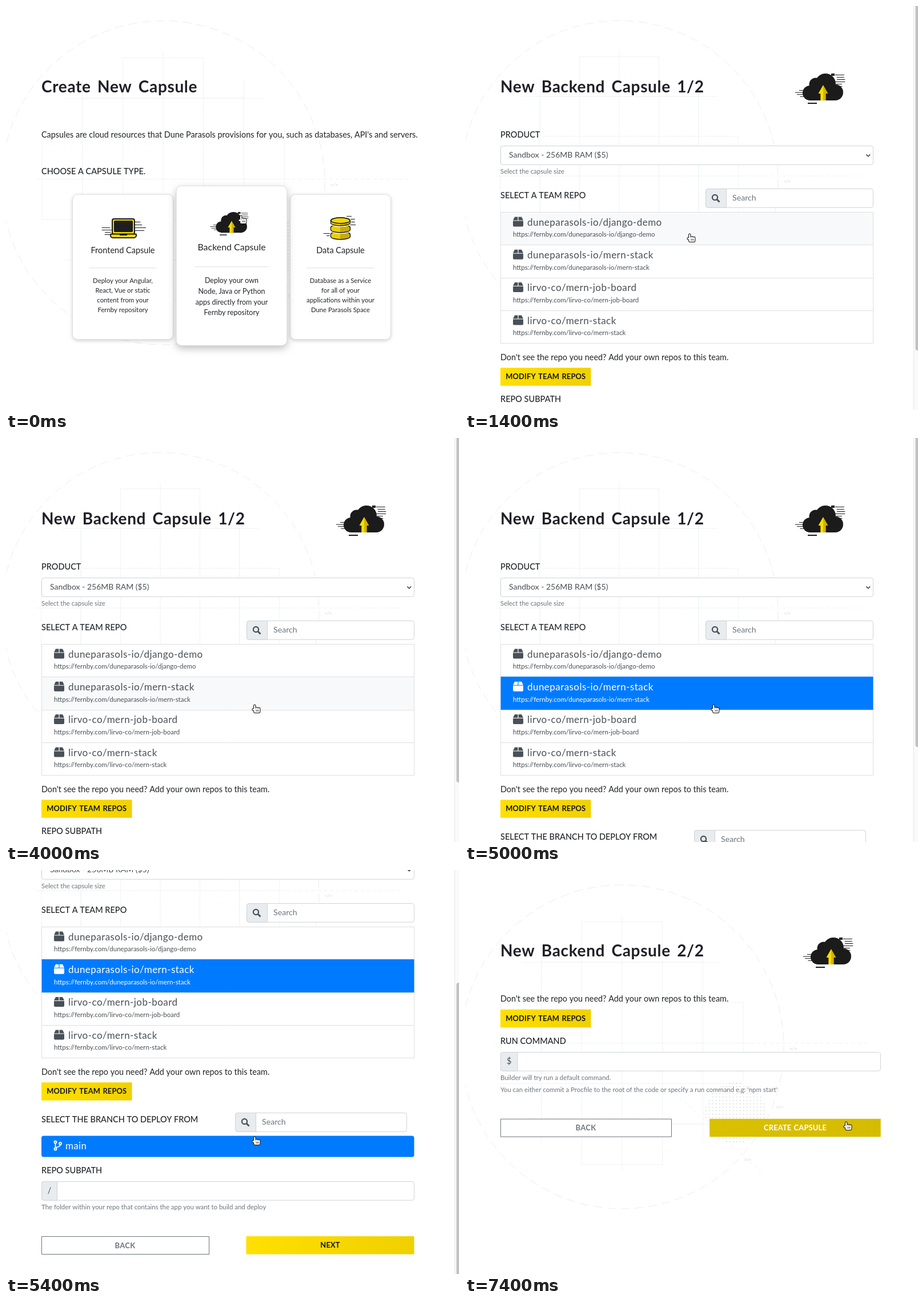
These frames come from a looping animation (793 px wide and 706 px high, 7600 ms). An HTML page with a canvas:

```html
<!DOCTYPE html>
<html lang="en">
<head>
<meta charset="utf-8">
<title>Create a capsule</title>
<style>
html, body { margin: 0; width: 100%; height: 100%; overflow: hidden; background: #fff; }
canvas { display: block; }
</style>
</head>
<body>
<canvas id="stage" width="793" height="706"></canvas>
<script>
const g = document.getElementById('stage').getContext('2d');
const W = 793, H = 706, LOOP = 7600, STEP = 200, SCROLL = 261, ROW = 57.3;
const INK = '#212529', GREY = '#6c757d', SLATE = '#495057', DARK = '#1b1b1b';
const BLUE = '#007bff', EDGE = '#ced4da', RULE = '#dfdfdf';

// ---- helpers ----
const rnd = n => {
  const v = Math.sin(n * 12.9898) * 43758.5453;
  return v - Math.floor(v);
};
const ease = u => {
  u = Math.min(1, Math.max(0, u));
  return u * u * (3 - 2 * u);
};

function text(s, x, y, size, { w = 400, c = INK, a = 'left', ls = 0, ws = 0 } = {}) {
  g.font = `${w} ${size}px Lato, "Open Sans", sans-serif`;
  g.letterSpacing = ls + 'px';
  g.wordSpacing = ws + 'px';
  g.textAlign = a;
  g.fillStyle = c;
  g.fillText(s, x, y);
}
const body = (s, y) => text(s, 62, y, 14.4);
const label = (s, y) => text(s, 62, y, 14.5, { w: 500 });
const help = (s, y) => text(s, 62, y, 11.4, { c: GREY });
const title = s => text(s, 62, 151, 28, { w: 700, c: '#1f1f27', ls: .65, ws: 4 });

function paint(fill, line, lw = 1) {
  if (fill) { g.fillStyle = fill; g.fill(); }
  if (line) { g.strokeStyle = line; g.lineWidth = lw; g.stroke(); }
}
function rect(x, y, w, h, c) {
  g.fillStyle = c;
  g.fillRect(x, y, w, h);
}
function box(x, y, w, h, r, ...style) {
  g.beginPath();
  g.roundRect(x, y, w, h, r);
  paint(...style);
}
function circle(x, y, r, ...style) {
  g.beginPath();
  g.arc(x, y, r, 0, 7);
  paint(...style);
}
function shape(pts, ...style) {
  g.beginPath();
  for (const [x, y] of pts) g.lineTo(x, y);
  g.closePath();
  paint(...style);
}
function line(x1, y1, x2, y2, c, lw = 1) {
  g.beginPath();
  g.moveTo(x1, y1);
  g.lineTo(x2, y2);
  paint(null, c, lw);
}
function dashed(on, off, draw) {
  g.setLineDash([on, off]);
  draw();
  g.setLineDash([]);
}
function shadow(c, blur, dy) {
  g.shadowColor = c;
  g.shadowBlur = blur;
  g.shadowOffsetY = dy;
}
function at(x, y, k, draw) {
  g.save();
  g.translate(x, y);
  g.scale(k, k);
  draw();
  g.restore();
}
// ragged speed lines, growing from x to the side given by dir
function bars(x, y, gap, n, dir, seed) {
  for (let i = 0; i < n; i++) {
    const len = 8 + 14 * rnd(seed + i), from = x + dir * 5 * rnd(seed + i + 40);
    rect(dir < 0 ? from - len : from, y + i * gap, len, 1, DARK);
  }
}

// ---- backdrop ----
function backdrop(k) {
  at(0, 0, k, () => {
    const u = 70.7, cx = 275, cy = 302.5, faint = '#f0f4f4';
    dashed(15, 9, () => circle(cx, 309, 283, null, '#ececec'));
    for (const a of [1, 2, 3])
      box(cx - a * u, cy - (4 - a) * u, 2 * a * u, 2 * (4 - a) * u, 0, null, faint);
    for (const d of [-2, 0, 2]) {
      const reach = d ? 175 : 223;
      line(cx - reach, cy + d * u, cx + reach, cy + d * u, faint);
      line(cx + d * u, cy - reach, cx + d * u, cy + reach, faint);
    }
    for (let i = -20; i <= 20; i++)
      for (let j = -20; j <= 20; j++)
        if (Math.abs(i) + Math.abs(j) < 29) rect(cx + i * u / 7, cy + j * u / 7, 1, 1, '#f5f7f7');
    for (let x = -52; x <= 52; x += 6)
      for (let y = -52; y <= 52; y += 6)
        if (Math.hypot(x, y) < 53.4) rect(473 + x, 424 + y, 1.3, 1.3, '#cacaca');
    dashed(6, 5, () => {
      line(500, cy, 705, cy, '#eef0f0');
      line(368, 390, 520, 530, '#f1f1f1');
    });
    for (const [x, y] of [[575, 315], [551, 417], [495, 509]])
      text('</>', x, y, 8, { c: '#cfcfcf', a: 'center' });
  });
}

// ---- icons ----
function cloud(x, y, k = 1) {
  at(x, y, k, () => {
    bars(20, -22, 4, 6, 1, 3);
    bars(-26, 5, 3.6, 4, -1, 9);
    rect(-27, 27, 16, 2, DARK);
    rect(14, -24, 6, 4, DARK);
    for (const [cx, cy, r] of [[-23, 10, 13], [-13, -5, 11.5], [4, -6, 18], [21, 9, 14]])
      circle(cx, cy, r, DARK);
    rect(-23, -4, 44, 27, DARK);
    for (const [side, c] of [[-1, '#f9de00'], [1, '#d3b200']])
      shape([[0, -4], [8.5 * side, 11], [4.7 * side, 11], [4.7 * side, 23], [0, 23]], c);
  });
}

function laptop() {
  bars(186, 387, 4, 4, -1, 5);
  bars(222, 377, 5, 4, 1, 8);
  box(186, 372, 39, 27, 3, '#f2d500', DARK, 2);
  box(189.5, 375.5, 32, 19, 1, '#1f1f1f', DARK);
  box(183, 398.5, 45, 6.5, [1, 1, 4, 4], '#f7da00', DARK, 2);
  rect(199, 398, 13, 3, DARK);
}

function disk() {
  bars(594, 367, 5, 4, 1, 2);
  bars(574, 397, 4, 2, -1, 6);
  const gold = g.createLinearGradient(568, 0, 603, 0);
  gold.addColorStop(.5, '#ecd000');
  gold.addColorStop(.5, '#c9ab00');
  for (const y of [399, 387, 375]) {
    g.beginPath();
    g.ellipse(585.5, y, 17, 5, 0, Math.PI, 0);
    g.ellipse(585.5, y + 4, 17, 5, 0, 0, Math.PI);
    g.closePath();
    paint(null, '#fff', 4);
    paint(gold, DARK, 1.4);
  }
  g.beginPath();
  g.ellipse(585.5, 375, 16.5, 5, 0, 0, 7);
  paint('#f4d900', DARK, 1.4);
}

function crate(x, y, c) {
  shape([[x + 3, y], [x + 8.4, y], [x + 8.4, y + 6], [x, y + 6]], c);
  shape([[x + 9.6, y], [x + 15, y], [x + 18, y + 6], [x + 9.6, y + 6]], c);
  box(x, y + 7, 18, 10, [0, 0, 2, 2], c);
}

function lens(x, y) {
  circle(x - 1.5, y - 1.5, 4.6, null, SLATE, 2.2);
  line(x + 2, y + 2, x + 6.5, y + 6.5, SLATE, 2.8);
}

function fork(x, y) {
  for (const [cx, cy] of [[2.5, 2.5], [2.5, 14.5], [11, 5]]) circle(x + cx, y + cy, 2, null, '#fff', 1.8);
  g.beginPath();
  g.moveTo(x + 2.5, y + 5);
  g.lineTo(x + 2.5, y + 12);
  g.quadraticCurveTo(x + 11, y + 11, x + 11, y + 7);
  paint(null, '#fff', 1.8);
}

// ---- controls ----
function field(x, y, w, mark, addon) {
  box(x + .5, y + .5, w, 32.7, 4, '#fff', EDGE);
  if (!addon) return;
  box(x + .5, y + .5, addon, 32.7, [4, 0, 0, 4], '#e9ecef', EDGE);
  text(mark, x + .5 + addon / 2, y + 21, 14.5, { c: SLATE, a: 'center' });
}
function search(x, y, w) {
  field(x, y, w, '', 36);
  lens(x + 18, y + 17);
  text('Search', x + 47, y + 21, 14.2, { c: GREY });
}
function button(s, x, y, w, hot) {
  const fill = g.createLinearGradient(x, y, x + w, y + 31);
  fill.addColorStop(0, hot ? '#d9c000' : '#ffe000');
  fill.addColorStop(1, hot ? '#d6bc00' : '#f0d000');
  rect(x, y, w, 31.5, fill);
  text(s, x + w / 2, y + 20, 12.9, { w: 700, c: hot ? '#fff' : '#15151a', a: 'center', ls: .15, ws: 1 });
}
function backButton(y, w) {
  box(62.5, y + .5, w, 31, 0, '#fff', GREY);
  text('BACK', 62 + w / 2, y + 20.5, 13, { w: 700, c: GREY, a: 'center', ls: .3 });
}
function repoHint(y) {
  body("Don't see the repo you need? Add your own repos to this team.", y);
  button('MODIFY TEAM REPOS', 62, y + 13.7, 158.5);
}

// ---- pages ----
function card(cx, k, icon, name, lines) {
  const w = 176 * k, h = 253.5 * k, y = 456 - h / 2 - 22 * (k - 1), big = k > 1;
  shadow(`rgba(0,0,0,${big ? .26 : .2})`, big ? 14 : 6, big ? 5 : 2);
  box(cx - w / 2, y, w, h, 9, '#fff');
  shadow('transparent', 0, 0);
  box(cx - w / 2, y, w, h, 9, null, '#dcdfe0');
  icon();
  text(name, cx, y + 102.5 * k, 14.5 * k, { a: 'center' });
  line(cx - 59 * k, y + 128.5 * k, cx + 59 * k, y + 128.5 * k, '#dedede');
  lines.forEach((s, i) => text(s, cx, y + (154.5 + i * 17) * k, 11.35 * k, { a: 'center' }));
}
function choosePage() {
  backdrop(1);
  title('Create New Capsule');
  body("Capsules are cloud resources that Dune Parasols provisions for you, such as databases, API's and servers.", 230);
  label('CHOOSE A CAPSULE TYPE.', 293.5);
  card(204.5, 1, laptop, 'Frontend Capsule',
    ['Deploy your Angular,', 'React, Vue or static', 'content from your', 'Fernby repository']);
  card(585.5, 1, disk, 'Data Capsule',
    ['Database as a Service', 'for all of your', 'applications within your', 'Dune Parasols Space']);
  card(395, 1.1, () => cloud(395, 378.5, .77), 'Backend Capsule',
    ['Deploy your own', 'Node, Java or Python', 'apps directly from your', 'Fernby repository']);
}

const REPOS = ['duneparasols-io/django-demo', 'duneparasols-io/mern-stack',
  'lirvo-co/mern-job-board', 'lirvo-co/mern-stack'];

function repoList(hover, picked) {
  box(62.5, 360.5, 652, 229, 0, '#fff', RULE);
  REPOS.forEach((repo, i) => {
    const y = 360 + i * ROW, on = i === picked, c = on ? '#fff' : SLATE;
    if (i === hover) rect(63, y + 1, 651, ROW - 1, '#f8f9fa');
    if (i) line(62, Math.round(y) + .5, 715, Math.round(y) + .5, RULE);
    if (on) rect(62.5, y - .3, 652, ROW + .6, BLUE);
    crate(84, y + 8.5, c);
    text(repo, 109, y + 23.7, 17, { c, ls: .45 });
    text('https://fernby.com/' + repo, 84, y + 43.2, 11.5, { c });
  });
}

const SIZES = ['Sandbox - 256MB RAM ($5)', 'Basic - 1GB RAM ($15)',
  'Standard - 2GB RAM ($25)', 'Premium - 4GB RAM ($50)'];

function menu() {
  shadow('rgba(0,0,0,.35)', 14, 4);
  rect(62, 243.5, 652, 99, '#fff');
  shadow('transparent', 0, 0);
  box(61.5, 243.5, 652.5, 99, 0, '#fff', '#a9abae');
  rect(62, 247, 652, 22.7, '#0058d0');
  text('✓', 67, 263, 13, { w: 700, c: '#fff' });
  SIZES.forEach((s, i) => text(s, 80, 263 + i * 23, 14.3, { c: i ? '#3a3d40' : '#fff' }));
}

function subpath(y) {
  label('REPO SUBPATH', y);
  field(62, y + 14, 652, '/', 27);
  help('The folder within your repo that contains the app you want to build and deploy', y + 63);
}

function formPage({ scroll, hover, picked, branches, open, hot }) {
  at(0, -scroll, 1, () => {
    backdrop(.982);
    title('New Backend Capsule 1/2');
    cloud(627, 142);
    label('PRODUCT', 230);
    field(62, 244, 652);
    text(SIZES[0], 77, 264.5, 14, { c: SLATE });
    for (const d of [-3.3, 3.3]) line(705.8 + d, 259.5, 705.8, 263, '#333', 1.5);
    help('Select the capsule size', 292.5);
    label('SELECT A TEAM REPO', 336);
    search(421, 319, 293);
    repoList(hover, picked);
    repoHint(618.5);
    if (branches) {
      label('SELECT THE BRANCH TO DEPLOY FROM', 702);
      search(401, 685, 300);
      box(62, 725.5, 652.5, 37, 4, BLUE);
      fork(84, 734);
      text('main', 104, 749, 17, { c: '#fff', ls: .3 });
    }
    subpath(branches ? 791 : 692);
    if (branches) {
      backButton(901, 293);
      button('NEXT', 420.5, 901, 294, hot);
    }
    if (open) menu();
  });
  rect(785.5, 0, 8, H, '#fafafa');
  line(785.5, 0, 785.5, H, '#e6e6e6');
  box(788.5, 202 * scroll / SCROLL - 5, 9, branches ? 545 : 607, 4, '#c1c1c1');
}

function runPage(hot) {
  backdrop(1);
  title('New Backend Capsule 2/2');
  cloud(641, 142);
  repoHint(230);
  label('RUN COMMAND', 304);
  field(62, 318, 665, '$', 29.5);
  help('Builder will try run a default command.', 367);
  help("You can either commit a Procfile to the root of the code or specify a run command e.g: 'npm start'", 387.5);
  backButton(434.7, 299);
  button('CREATE CAPSULE', 428.2, 434.8, 299.5, hot);
}

// ---- pointer ----
// start, end, then where the pointer arrives
const MOVES = [[800, 1400, 393, 398], [1800, 2400, 480, 260], [3000, 4000, 435, 466],
  [5400, 6000, 604, 657.5], [6600, 7200, 667, 440]];

function pointer(t) {
  let x = 411, y = 366;
  for (const [t0, t1, toX, toY] of MOVES) {
    const e = ease((t - t0) / (t1 - t0));
    x += (toX - x) * e;
    y += (toY - y) * e;
  }
  return [x, y];
}

function hand() {
  for (const [o, c] of [[1, '#111'], [0, '#fff']]) {
    const part = (x, y, w, h) => box(x - o, y - o, w + 2 * o, h + 2 * o, 1.5 + o, c);
    part(-1, .5, 2.4, 10);
    for (let i = 1; i < 4; i++) part(2.7 * i - 1, 4.5 + i * .4, 2.4, 6);
    part(-3.5, 7, 4, 3);
    part(-.8, 8, 10, 6);
  }
  for (let x = 3; x < 8; x += 2) line(x, 9, x, 12, '#222', .8);
}
function arrow() {
  const pts = [[0, 0], [0, 12.5], [2.9, 9.9], [4.8, 14.2], [6.8, 13.3], [4.9, 9.1], [8.8, 9]];
  shape(pts, '#000', '#fff', 1.6);
  shape(pts, '#000');
}

// ---- timeline ----
function draw(t) {
  const [x, y] = pointer(t);
  let link = true;
  rect(0, 0, W, H, '#fff');
  if (t < 800) choosePage();
  else if (t < 6200) {
    const open = t >= 2600 && t < 3200;
    const scroll = SCROLL * ease((t - 5000) / 400);
    const row = Math.floor((y + scroll - 360) / ROW);
    const hover = !open && row >= 0 && row < REPOS.length ? row : -1;
    const hot = t > 5400 && y > 640;
    formPage({ scroll, hover, open, hot, picked: t >= 4400 ? 1 : -1, branches: t >= 4600 });
    link = hover >= 0 || hot || scroll > 0 && t < 5600;
  } else {
    link = y > 435 && y < 466;
    runPage(link);
  }
  if (t === 2600 || t === 2800) circle(x, y + 2, t === 2600 ? 22 : 18, null, 'rgba(110,165,240,.75)', 2);
  if (t === 6200 || t === 6400) circle(x - .2, y, 24, null, '#8ab8ee', 2.3);
  at(x, y, 1, link ? hand : arrow);
}

const start = performance.now();
function tick() {
  const t = (performance.now() - start) % LOOP;
  draw(Math.floor(t / STEP) * STEP);
  requestAnimationFrame(tick);
}
tick();
</script>
</body>
</html>
```
